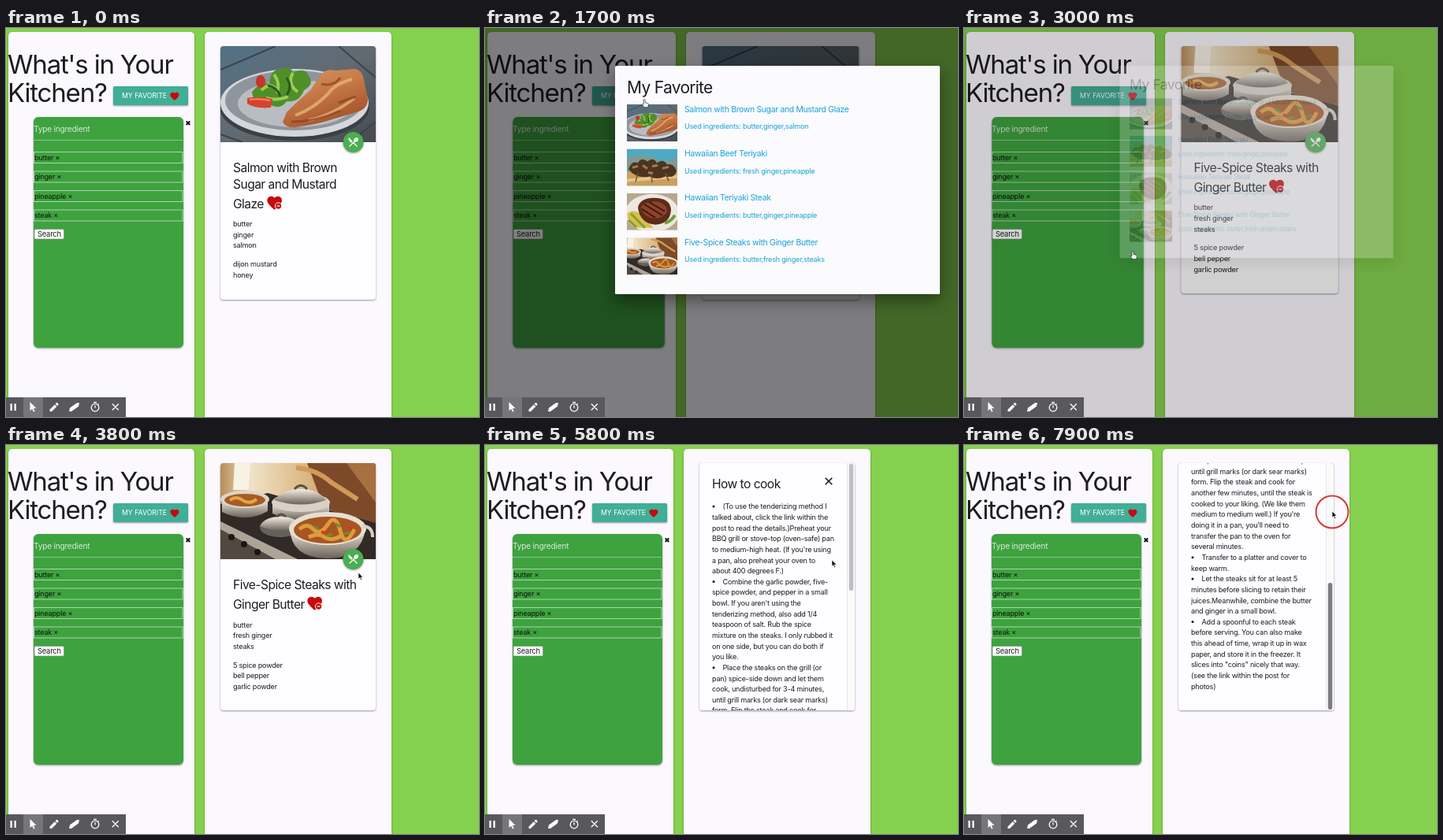
Recreate the animation shown at these times as an HTML page. Size 600 by 494 pixels, loop 8 s.

```html
<!DOCTYPE html>
<html lang="en">
<head>
<meta charset="utf-8">
<title>What's in Your Kitchen?</title>
<style>
html, body { margin: 0; width: 100%; height: 100%; overflow: hidden; background: #85d04e; }
svg { display: block; width: 600px; height: 494px; font-family: Inter, sans-serif; }
text { fill: #1d1c20; white-space: pre; }
.h1 { font-size: 33px; letter-spacing: -.036em; }
.h2 { font-size: 21px; letter-spacing: -.033em; }
.h3 { font-size: 15.6px; letter-spacing: -.035em; }
.link { font-size: 10.4px; letter-spacing: -.03em; fill: #1ba3dc; }
.used { fill: #1ba3dc; }
.p { font-size: 9.1px; letter-spacing: -.025em; }
.depth { filter: drop-shadow(0 1px 1.2px rgba(0,0,0,.4)); }
.deep { filter: drop-shadow(0 8px 10px rgba(0,0,0,.4)); }
</style>
</head>
<body>
<svg viewBox="0 0 600 494">
<defs>
  <path id="heart" d="M12 21.35l-1.45-1.32C5.4 15.36 2 12.28 2 8.5 2 5.42 4.42 3 7.5 3c1.74 0 3.41.81 4.5 2.09C13.09 3.81 14.76 3 16.5 3 19.58 3 22 5.42 22 8.5c0 3.78-3.4 6.86-8.55 11.54z" fill="#c8090d"/>
  <g id="badge">
    <use href="#heart" transform="translate(-11.5 -11.5) scale(.93)"/>
    <circle cx="4.5" cy="3.5" r="4.2" fill="#c8090d" stroke="#fff" stroke-width="1"/>
    <path d="M2.5 3.5h4" stroke="#fff" stroke-width="1.2"/>
  </g>
  <linearGradient id="wood" x2="1" y2="1"><stop stop-color="#527186"/><stop offset=".5" stop-color="#626a72"/><stop offset="1" stop-color="#454a50"/></linearGradient>
  <linearGradient id="steel" x2="0" y2="1"><stop stop-color="#f2eee6"/><stop offset=".55" stop-color="#aaa297"/><stop offset="1" stop-color="#6a6259"/></linearGradient>
  <linearGradient id="fish" x2=".5" y2="1"><stop stop-color="#d99a62"/><stop offset=".5" stop-color="#c67846"/><stop offset="1" stop-color="#a4522b"/></linearGradient>
  <linearGradient id="wall" x2="1"><stop stop-color="#b88d58"/><stop offset=".2" stop-color="#efe2c6"/><stop offset=".6" stop-color="#d8b27a"/><stop offset="1" stop-color="#8a5a32"/></linearGradient>

  <symbol id="salmon" viewBox="0 0 197 122" preserveAspectRatio="xMidYMid slice">
    <path d="M0 0h197v122H0z" fill="url(#wood)"/>
    <path d="M0 30L70 0M0 112l28 10M150 0l47 40M165 122l32-26" stroke="#39434d" stroke-width="2"/>
    <ellipse cx="94" cy="78" rx="95" ry="42" fill="#3b4046"/>
    <ellipse cx="94" cy="72" rx="94" ry="43" fill="#d3d6da"/>
    <ellipse cx="94" cy="69" rx="88" ry="38" fill="#8e959d"/>
    <ellipse cx="96" cy="73" rx="74" ry="30" fill="#b9bdc2"/>
    <path d="M40 58q12-14 22-10 2-20 14-18 12-8 16 4 16-8 20 4 8 10-6 18-6 16-22 14-8 12-22 4-20 2-22-16z" fill="#4f8f2a"/>
    <path d="M52 56q10-10 18-2M68 36q8 10 4 24M92 34q-8 14 6 24M58 66q14 4 28-2" stroke="#9ccb52" stroke-width="4" fill="none"/>
    <path d="M60 50q12 2 16 14M84 40q8 12 0 22" stroke="#285c1c" stroke-width="3" fill="none"/>
    <ellipse cx="51" cy="45" rx="6" ry="8" fill="#c6342a"/>
    <path d="M34 66q15-3 32 1l-2 11q-20 2-30-5z" fill="#d5432d"/>
    <path d="M37 68q12-2 26 1" stroke="#f08a63" stroke-width="2" fill="none"/>
    <path d="M84 84q16-16 30-28l14-20q6-8 18-5l24-2q10 1 12 14l5 24q0 12-12 16l-30 9q-24 8-50 11-13 1-16-7z" fill="url(#fish)"/>
    <path d="M95 88q24-9 42-28 8-12 30-18M112 94q30-6 58-28" stroke="#e9b47b" stroke-width="4" fill="none" opacity=".75"/>
    <path d="M90 96q32 0 62-14M128 48q16 4 24-8M150 72l22-8" stroke="#8c4020" stroke-width="3" fill="none" opacity=".7"/>
  </symbol>

  <symbol id="pans" viewBox="0 0 197 122" preserveAspectRatio="xMidYMid slice">
    <path d="M0 0h197v122H0z" fill="url(#wall)"/>
    <path d="M18 0h20l-2 34H16z" fill="#f8f2e4"/>
    <path d="M110 0h87v82l-66-26z" fill="#7c4a29"/>
    <path d="M160 0h37v50z" fill="#a7703e"/>
    <path d="M96 6q26 2 44 18l34 22" stroke="#d29a57" stroke-width="6" fill="none"/>
    <path d="M0 52l60-14 137 38v46H0z" fill="#312a26"/>
    <path d="M0 74l98 48H0z" fill="#ada397"/>
    <path d="M0 84l70 38H0z" fill="#51483f"/>
    <g fill="#191716"><circle cx="14" cy="94" r="4"/><circle cx="30" cy="103" r="4"/><circle cx="47" cy="113" r="4"/></g>
    <path d="M2 46h58v15q-28 16-58 1z" fill="url(#steel)"/>
    <ellipse cx="31" cy="46" rx="31" ry="11" fill="#ddd5c7"/>
    <ellipse cx="31" cy="47" rx="26" ry="8" fill="#a75b24"/>
    <path d="M12 47q8-6 16 0t18-1" stroke="#e5a545" stroke-width="4" fill="none"/>
    <path d="M66 50h72v14q-34 17-72 0z" fill="url(#steel)"/>
    <ellipse cx="102" cy="50" rx="37" ry="12" fill="#d8d1c4"/>
    <path d="M68 47q12-14 34-14t32 14q-31 11-66 0z" fill="url(#steel)"/>
    <path d="M94 33q8-9 16 0" stroke="#57504a" stroke-width="3" fill="none"/>
    <ellipse cx="76" cy="82" rx="26" ry="12" fill="#66605a"/>
    <path d="M50 80q6-12 26-12t26 12q-24 12-52 0z" fill="url(#steel)"/>
    <path d="M71 68q6-6 12 0" stroke="#57504a" stroke-width="3" fill="none"/>
    <path d="M88 82q1 38 46 39t50-38z" fill="url(#steel)"/>
    <ellipse cx="136" cy="83" rx="49" ry="21" fill="#e7dfd2"/>
    <ellipse cx="136" cy="85" rx="43" ry="17" fill="#a65621"/>
    <path d="M100 84q10-9 18 0t18-6 16 8 18-2M112 94q12-6 20 0t22-2" stroke="#df9a3c" stroke-width="5" fill="none"/>
    <path d="M118 80l7 4M146 77l6 4M134 92l8-2M156 90l8-2" stroke="#6d8d30" stroke-width="3"/>
    <path d="M128 87l7 2M162 81l5 3" stroke="#ce3c20" stroke-width="3"/>
    <path d="M180 80q13 0 13 14" stroke="#d8d0c4" stroke-width="4" fill="none"/>
  </symbol>

  <symbol id="skewer" viewBox="0 0 64 47">
    <path d="M0 0h64v47H0z" fill="#4fa9c2"/>
    <path d="M0 12q20-8 36 0t28-2v16H0z" fill="#7d9a94"/>
    <path d="M0 29l64-3v21H0z" fill="#cba05e"/>
    <path d="M0 40l64-5" stroke="#e5c58a" stroke-width="4"/>
    <path d="M2 26q4-12 12-8 4-8 12-2 8-6 12 2 8-6 13 2 8-2 12 8-2 10-14 7-12 5-20 0-16 4-27-9z" fill="#4b3521"/>
    <path d="M7 24l7-2M20 21l6 4M32 22l7-1M45 25l8-2M27 30l6 1" stroke="#a7794a" stroke-width="3"/>
    <path d="M14 31l-3 11M31 32l1 11M49 31l4 10" stroke="#76532e" stroke-width="1.5"/>
  </symbol>

  <symbol id="steak" viewBox="0 0 64 47">
    <path d="M0 0h64v47H0z" fill="#b7a78f"/>
    <ellipse cx="32" cy="25" rx="34" ry="24" fill="#ece8df"/>
    <path d="M0 26q10-8 20 3l14 15H12Q2 40 0 26z" fill="#d9bf4b"/>
    <path d="M5 26l18 18M2 34l10 9" stroke="#7ea03c" stroke-width="3"/>
    <path d="M14 18q3-12 20-12 21 0 22 15-1 18-20 19-20-2-22-22z" fill="#5d2b1b"/>
    <path d="M18 17q8-8 22-6 12 4 11 13-8 11-22 7-11-5-11-14z" fill="#8c4429"/>
    <path d="M22 14l23 14M28 11l20 12M19 20l17 11" stroke="#43190f" stroke-width="2"/>
    <path d="M48 38q8-2 13-10" stroke="#719b3b" stroke-width="4" fill="none"/>
  </symbol>

  <clipPath id="cardClip"><rect x="272" y="23" width="197" height="314" rx="4"/></clipPath>
  <clipPath id="photoClip"><path d="M272 145V27q0-4 4-4h189q4 0 4 4v118z"/></clipPath>
</defs>

<rect width="600" height="494" fill="#85d04e"/>
<g id="left">
  <rect class="depth" x="3" y="5" width="236" height="500" rx="5" fill="#fbf9fd"/>
  <rect class="depth" x="35" y="113" width="190" height="293" rx="6" fill="#3ea23f"/>
  <path d="M35 142.5h189" stroke="#8bc78c"/>
  <g id="tokenBoxes" fill="none" stroke="#a9d6aa"></g>
</g>
<g id="leftText">
  <g class="depth"><rect x="136" y="74" width="95" height="24" rx="1.5" fill="#41ae97"/></g>
  <use href="#heart" transform="translate(207.2 80) scale(.56)"/>
  <rect x="36" y="255.500" width="37.500" height="12.500" rx="1.500" fill="#fff" stroke="#6f8f70" stroke-width=".6"/>
  <path d="M228.700 118.400l4.600 4.600m0-4.600l-4.600 4.600" stroke="#111" stroke-width="2"/>
</g>
<g id="right">
  <rect class="depth" x="252" y="5" width="237" height="500" rx="5" fill="#fbf9fd"/>
  <rect id="card" class="depth" x="272" y="23" width="197" height="314" rx="4" fill="#fefdff"/>
  <g clip-path="url(#photoClip)"><use id="photo" x="272" y="23" width="197" height="122"/></g>
  <g class="depth"><circle cx="440.500" cy="145" r="13" fill="#4bae50"/></g>
  <path transform="translate(432.600 137) scale(.66)" fill="#fff" d="M8.100 13.340l2.830-2.830L3.910 3.500c-1.560 1.560-1.560 4.090 0 5.660l4.190 4.180zm6.780-1.810c1.530.710 3.680.210 5.270-1.380 1.910-1.910 2.280-4.650.810-6.120-1.460-1.460-4.200-1.100-6.120.810-1.590 1.590-2.090 3.740-1.380 5.270L3.700 19.870l1.410 1.410L12 14.410l6.880 6.880 1.410-1.410L13.410 13l1.470-1.470z"/>
  <g id="dishA"><use href="#badge" x="341" y="222.500"/></g>
  <g id="dishB"><use href="#badge" x="392" y="201.500"/></g>
  <g clip-path="url(#cardClip)">
    <g id="reveal">
      <rect x="272" y="23" width="197" height="314" fill="#fefdff"/>
      <g id="recipe"><path d="M431.700 41.700l8.600 8.600m0-8.600l-8.600 8.600" stroke="#111" stroke-width="1.500"/></g>
      <rect x="459.500" y="22" width="11" height="317" fill="#fafafa" stroke="#e6e5e8"/>
      <rect id="thumb" x="461.800" y="24" width="5.400" height="161" rx="2.700"/>
    </g>
  </g>
</g>
<rect id="shade" width="600" height="494"/>
<g id="modal">
  <rect class="deep" x="165" y="48" width="412" height="290" rx="1.500" fill="#fbfafc"/>
</g>
<g id="bar">
  <rect y="469" width="152" height="25" fill="#59585b"/>
  <rect x="22" y="469" width="25" height="25" fill="#767578"/>
  <g fill="#fff">
    <path d="M5.500 477h2.300v9H5.500zM10.500 477h2.300v9h-2.300z"/>
    <path d="M30.500 475v11l2.700-2.300 1.700 3.800 1.700-.8-1.700-3.700h3.600z"/>
    <path d="M55.500 484.500v2.500H58l6.300-6.300-2.500-2.500zM62.600 477.400l1.300-1.300q.6-.5 1.200 0l1.300 1.300q.5.600 0 1.200l-1.300 1.300z"/>
    <path d="M81 482.500l9-6.500h3l-1 4.500-9 6.500h-3z"/>
  </g>
  <g fill="none" stroke="#fff" stroke-width="1.300">
    <circle cx="113" cy="482" r="4.800"/><path d="M111 475.300h4M113 479.300v3.200M116.600 478.300l1-1M134.800 477.300l8 8m0-8l-8 8"/>
  </g>
</g>
<g id="ring" fill="none"><circle r="20.500" stroke="#fff" stroke-width="3" opacity=".7"/><circle r="20.500" stroke="#d8382f" stroke-width="2"/></g>
<path id="arrow" d="M0 0v8.200l1.900-1.700 1.400 3 1.300-.6-1.400-2.900h2.700z" fill="#111" stroke="#fff" stroke-width=".6"/>
<path id="hand" d="M-1 0q1-1.200 2 0v3.500l3.600.9q1 .4.800 1.500L4.600 9.500H0L-3 6q0-1.300 2-.2z" fill="#fff" stroke="#222" stroke-width=".7"/>
</svg>
<script>
const LOOP = 8000, NS = 'http://www.w3.org/2000/svg';
const el = id => document.getElementById(id);
const add = (parent, tag, attrs, str) => {
  const node = document.createElementNS(NS, tag);
  for (const k in attrs) node.setAttribute(k, attrs[k]);
  if (str) node.textContent = str;
  return el(parent).appendChild(node);
};
const text = (parent, cls, x, y, str, style = '') => add(parent, 'text', { class: cls, x, y, style }, str);
const lines = (parent, cls, x, y, step, list) => list.forEach((s, i) => text(parent, cls, x, y + i * step, s));

lines('leftText', 'h1', 2, 58, 36.2, ["What's in Your", 'Kitchen?']);
text('leftText', 'p', 147, 89.400, 'MY FAVORITE', 'fill:#fff;letter-spacing:0;font-size:8.7px');
text('leftText', 'p', 35, 131.800, 'Type ingredient', 'fill:#d6ead7;font-size:10.2px');
text('leftText', 'p', 40, 265, 'Search', 'font-size:9.4px');
['butter', 'ginger', 'pineapple', 'steak'].forEach((s, i) => {
  const y = 157.500 + i * 24.500;
  add('tokenBoxes', 'rect', { x: 35.500, y, width: 188.500, height: 14 });
  text('leftText', 'p', 36, y + 10.300, s + ' ×', 'fill:#0b170b');
});

lines('dishA', 'h3', 288, 183, 21, ['Salmon with Brown', 'Sugar and Mustard']);
text('dishA', 'h3', 288, 229, 'Glaze');
lines('dishA', 'p', 288, 252, 13.700, ['butter', 'ginger', 'salmon']);
lines('dishA', 'p', 288, 303, 13.700, ['dijon mustard', 'honey']);
lines('dishB', 'h3', 288, 183, 25, ['Five-Spice Steaks with', 'Ginger Butter']);
lines('dishB', 'p', 288, 231.500, 13.700, ['butter', 'fresh ginger', 'steaks']);
lines('dishB', 'p', 288, 282.500, 13.700, ['5 spice powder', 'bell pepper', 'garlic powder']);

text('recipe', 'h3', 288, 55.300, 'How to cook');
const steps = `*(To use the tenderizing method I
talked about, click the link within the
post to read the details.)Preheat your
BBQ grill or stove-top (oven-safe) pan
to medium-high heat. (If you're using
a pan, also preheat your oven to
about 400 degrees F.)
*Combine the garlic powder, five-
spice powder, and pepper in a small
bowl. If you aren't using the
tenderizing method, also add 1/4
teaspoon of salt. Rub the spice
mixture on the steaks. I only rubbed it
on one side, but you can do both if
you like.
*Place the steaks on the grill (or
pan) spice-side down and let them
cook, undisturbed for 3-4 minutes,
until grill marks (or dark sear marks)
form. Flip the steak and cook for
another few minutes, until the steak is
cooked to your liking. (We like them
medium to medium well.) If you're
doing it in a pan, you'll need to
transfer the pan to the oven for
several minutes.
*Transfer to a platter and cover to
keep warm.
*Let the steaks sit for at least 5
minutes before slicing to retain their
juices.Meanwhile, combine the butter
and ginger in a small bowl.
*Add a spoonful to each steak
before serving. You can also make
this ahead of time, wrap it up in wax
paper, and store it in the freezer. It
slices into "coins" nicely that way.
(see the link within the post for
photos)`;
steps.split('\n').forEach((s, i) => {
  const y = 81.300 + i * 13.640, item = s[0] === '*';
  if (item) add('recipe', 'circle', { cx: 290, cy: y - 3.200, r: 1.500, fill: '#111' });
  text('recipe', 'p', item ? 301.500 : 288, y, item ? s.slice(1) : s);
});

text('modal', 'h2', 180, 83.200, 'My Favorite');
[['salmon', 'Salmon with Brown Sugar and Mustard Glaze', 'butter,ginger,salmon'],
 ['skewer', 'Hawaiian Beef Teriyaki', 'fresh ginger,pineapple'],
 ['steak', 'Hawaiian Teriyaki Steak', 'butter,ginger,pineapple'],
 ['pans', 'Five-Spice Steaks with Ginger Butter', 'butter,fresh ginger,steaks']
].forEach(([pic, name, used], i) => {
  const y = 97 + i * 56.400;
  add('modal', 'use', { href: '#' + pic, x: 180, y, width: 64, height: 47 });
  text('modal', 'link', 253, y + 9.500, name);
  text('modal', 'p used', 253, y + 31.200, 'Used ingredients: ' + used);
});

const clamp = v => Math.max(0, Math.min(1, v));
const span = (t, a, b) => clamp((t - a) / (b - a));
const smooth = p => p * p * (3 - 2 * p);
const outQuad = p => 1 - (1 - p) ** 2;
const outCubic = p => 1 - (1 - p) ** 3;
const show = (id, on) => el(id).setAttribute('display', on ? 'inline' : 'none');
const move = (id, value) => el(id).setAttribute('transform', value);

const OPEN = 885, CLOSE = 2900, SWAP = 3000, REVEAL = 5350;
const path = [[100, 300, 150], [700, 202, 89], [1650, 202, 89], [2450, 214, 284], [3150, 214, 284],
  [3750, 447, 162], [4400, 447, 162], [4850, 427, 154], [4950, 427, 154], [5200, 440, 146],
  [5800, 440, 146], [6500, 445, 99], [7400, 445, 99], [7700, 467, 84]];
const clicks = [[780, 930, 201, 88], [2600, 2830, 210, 286], [5230, 5400, 440, 147], [7800, 8000, 467, 85]];

function pointer(t) {
  let i = 0;
  while (i < path.length - 2 && t > path[i + 1][0]) i++;
  const [a, x, y] = path[i], [b, u, v] = path[i + 1], p = smooth(span(t, a, b));
  return [x + (u - x) * p, y + (v - y) * p];
}

function draw(t) {
  const open = t >= OPEN && t < CLOSE + 250;
  const leaving = t >= CLOSE;
  const p = leaving ? span(t, CLOSE, CLOSE + 250) : span(t, OPEN, OPEN + 250);
  const fade = leaving ? 1 - outQuad(p) : outQuad(p);
  const grow = leaving ? 1 - outCubic(p) : outCubic(p);
  // the page widens a little while its scrollbar is hidden
  move('left', open ? 'translate(3) scale(1.0127 1) translate(-3)' : '');
  move('right', open ? 'translate(255) scale(1.0127 1) translate(-252)' : '');
  show('shade', open);
  show('modal', open);
  el('shade').setAttribute('opacity', fade / 2);
  el('modal').setAttribute('opacity', grow);
  move('modal', `translate(371 ${193 - 29 * (1 - grow)}) scale(${.8 + .2 * grow}) translate(-371 -193)`);

  const second = t >= SWAP;
  show('dishA', !second);
  show('dishB', second);
  el('photo').setAttribute('href', second ? '#pans' : '#salmon');
  el('card').setAttribute('height', second ? 314 : 322);

  show('reveal', t >= REVEAL);
  move('reveal', `translate(0 ${314 * (1 - smooth(span(t, REVEAL, REVEAL + 300)))})`);
  const scroll = .55 * smooth(span(t, 6820, 7220)) + .45 * smooth(span(t, 7350, 7750));
  move('recipe', `translate(0 ${-290 * scroll})`);
  move('thumb', `translate(0 ${151 * scroll})`);
  el('thumb').setAttribute('fill', t > 7700 ? '#7d7d7f' : '#bfbec1');

  const [x, y] = pointer(t);
  const over = (t > 600 && t < CLOSE + 200) || (t > 5080 && t < REVEAL + 200);
  show('arrow', t >= 100 && !over);
  show('hand', over);
  move('arrow', `translate(${x} ${y})`);
  move('hand', `translate(${x} ${y})`);
  const hit = clicks.find(c => t >= c[0] && t < c[1]);
  show('ring', hit);
  if (hit) move('ring', `translate(${hit[2]} ${hit[3]})`);
}

const start = performance.now();
function tick() {
  draw((performance.now() - start) % LOOP);
  requestAnimationFrame(tick);
}
draw(0);
requestAnimationFrame(tick);
</script>
</body>
</html>
```
